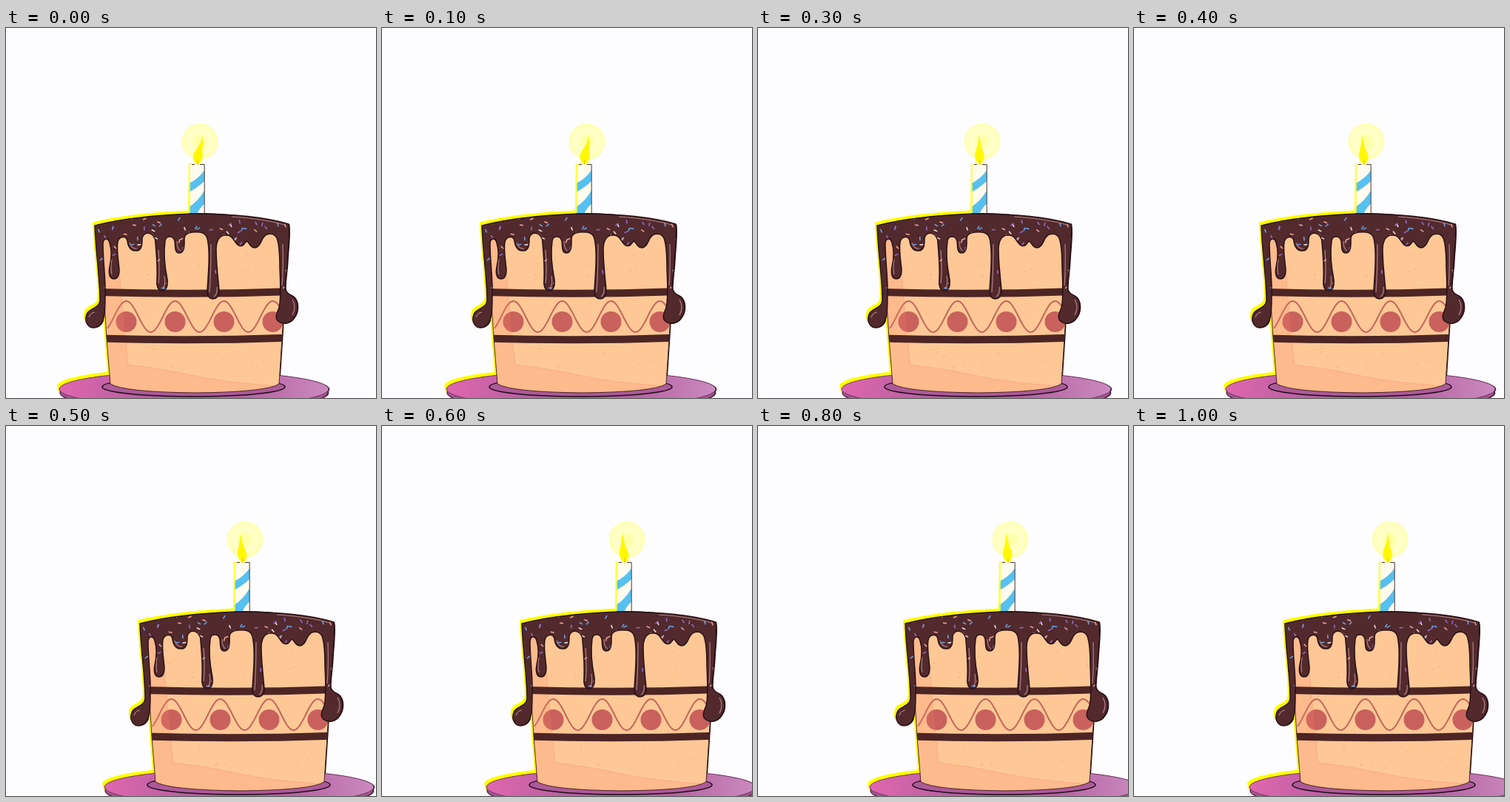
An HTML page with a canvas that plays this animation: 500 by 500 pixels, repeating every 1100 ms.

```html
<!DOCTYPE html>
<html lang="en">
<head>
<meta charset="utf-8">
<title>Birthday cake</title>
<style>
html, body { margin: 0; width: 100%; height: 100%; overflow: hidden; background: #fdfdff; }
canvas { display: block; width: 500px; height: 500px; }
</style>
</head>
<body>
<canvas id="stage" width="500" height="500"></canvas>
<script>
const ctx = document.getElementById('stage').getContext('2d');
const LOOP = 1100, STEP = 100, TRAVEL = 84, EASE_MS = 1050;
const TIPS = [265, 264, 261, 258, 256.5, 256, 256, 256, 257, 258, 259];
const WAVE_X = 162.5, WAVE_LEN = 66;

const body = new Path2D('M123 270 L132 355 L136 420 L141 481 Q160 492 256 493 Q352 492 369 481 L373 420 L377 355 L380 270 Z');
const icing = new Path2D(
  'M120 267 C150 259 200 253 250 251 C300 251 350 255 382 265' +
  'C384 278 381 300 380 320 L377 350 C377 356 382 360 387 362 C396 367 396 384 389 392' +
  'C384 400 374 401 369 397 C363 393 365 387 369 378 C372 365 371 345 370 325' +
  'C370 310 369 292 366 284 C362 276 352 277 348 283 C345 286 344 296 336 297' +
  'C329 297 329 289 325 288 C322 292 320 296 315 294 C308 291 308 280 298 280' +
  'C288 279 284 288 284 300 C284 320 287 340 288 355 C288 363 284 366 280 366' +
  'C275 366 272 362 272 355 C273 335 275 320 274 300 C273 285 272 277 262 276' +
  'C250 275 241 277 241 285 C241 292 242 304 234 304 C227 304 229 293 228 288' +
  'C226 280 216 280 215 288 C213 302 214 320 218 340 C219 350 216 355 211 355' +
  'C205 355 203 348 204 340 C205 320 203 305 202 290 C202 276 186 273 184 284' +
  'C184 292 184 301 176 301 C169 302 165 296 164 288 C163 280 153 281 151 289' +
  'C149 300 152 315 153 326 C153 335 150 339 146 339 C141 339 138 334 140 323' +
  'C143 310 143 300 140 290 C138 282 131 284 131 292 C131 315 135 340 134 362' +
  'C134 382 134 400 123 404 C112 408 105 398 109 387 C112 378 126 380 127 368' +
  'C127 340 121 300 120 267 Z');
const shine = new Path2D(
  'M305 255 Q350 258 376 266 M143 312 Q141 326 143 333 M206 300 Q208 330 206 345' +
  'M214 335 Q216 348 212 352 M277 292 Q277 330 275 357 M285 350 Q286 360 281 363' +
  'M187 281 Q193 275 200 281 M231 288 Q231 299 236 301 M167 290 Q170 299 177 298' +
  'M374 292 Q375 325 373 348 M112 391 Q114 385 120 384 M387 367 Q393 377 387 388');
const shade = new Path2D('M120 262 L149 262 Q154 360 165 455 Q215 461 250 469 Q300 480 372 484 L372 500 L130 500 Z');
const candle = new Path2D('M248 184 L268 183 L268 251 L247 251 Z');
const plate = ellipse(254, 488, 182, 24);
const rim = ellipse(254, 493, 181, 24);
const foot = ellipse(253.5, 485, 123.5, 13);

const plateFill = gradient(ctx.createLinearGradient(72, 0, 437, 0), '#e066ae', '#b3609f', '#b3609f', '#cb8abf');
const halo = gradient(ctx.createRadialGradient(262, 153.5, 4, 262, 153.5, 24.5), '#ffffa4', '#ffffcc', '#ffffb4');

function ellipse(x, y, rx, ry) {
  const path = new Path2D();
  path.ellipse(x, y, rx, ry, 0, 0, 2 * Math.PI);
  return path;
}

function gradient(paint, ...colors) {
  colors.forEach((c, i) => paint.addColorStop(i / (colors.length - 1), c));
  return paint;
}

function fill(path, color) {
  ctx.fillStyle = color;
  ctx.fill(path);
}

function stroke(path, color, width) {
  ctx.strokeStyle = color;
  ctx.lineWidth = width;
  ctx.stroke(path);
}

function inside(path, draw) {
  ctx.save();
  ctx.clip(path);
  draw();
  ctx.restore();
}

function random(seed) {
  return () => (seed = seed * 16807 % 2147483647) / 2147483647;
}

function silhouette(dx, dy, color) {
  ctx.save();
  ctx.translate(dx, dy);
  for (const p of [plate, rim, body, icing]) fill(p, color);
  ctx.restore();
}

// Yellow edge on the upper left, black edge on the right.
function drawEdges() {
  silhouette(1.3, .3, '#201018');
  const left = new Path2D();
  left.rect(0, 0, 248, 500);
  inside(left, () => silhouette(-3, -4.5, '#ffff00'));
}

function drawPlate() {
  fill(rim, '#a65490');
  stroke(rim, '#4a2040', 1.2);
  fill(plate, plateFill);
  stroke(plate, '#6d3560', 1);
  fill(foot, '#ac5a98');
  stroke(foot, '#1e0d18', 1.6);
}

function drawBand(y) {
  stroke(new Path2D(`M125 ${y} Q256 ${y + 4} 385 ${y - 1}`), '#4c2524', 10);
}

function drawBody() {
  fill(body, '#fdc896');
  inside(body, () => {
    const rnd = random(71);
    for (let i = 0; i < 26; i++) {
      const x = 140 + rnd() * 225, y = i < 16 ? 305 + rnd() * 40 : 430 + rnd() * 30;
      stroke(new Path2D(`M${x} ${y} l3 -2`), '#f9b48a', 1.2);
    }
    const wave = new Path2D();
    for (let x = 137; x < 380; x += 2) {
      wave.lineTo(x, 390 - 21 * Math.cos((x - WAVE_X) / WAVE_LEN * 2 * Math.PI));
    }
    stroke(wave, '#c4655c', 2);
    for (let i = 0; i < 4; i++) fill(ellipse(WAVE_X + i * WAVE_LEN, 397, 14, 14), '#c9615c');
    fill(shade, 'rgba(248,130,100,.2)');
    stroke(shade, 'rgba(235,115,95,.25)', 1);
    drawBand(357);
    drawBand(419.5);
  });
  stroke(body, '#3a1a1a', .9);
}

function drawIcing() {
  fill(icing, '#522a2d');
  inside(icing, () => {
    const rnd = random(2024);
    const colors = ['#f0a49c', '#6aa8f0', '#f6e4e4', '#9a6ad0'];
    for (let i = 0; i < 110; i++) {
      const x = 114 + rnd() * 272, y = i < 50 ? 256 + rnd() * 29 : 285 + rnd() * 110;
      const a = rnd() * Math.PI;
      stroke(new Path2D(`M${x} ${y} l${5 * Math.cos(a)} ${5 * Math.sin(a)}`), colors[i % 4], 1.5);
    }
    stroke(shine, 'rgba(218,165,170,.7)', 1.2);
  });
  stroke(icing, '#2a1114', 1.5);
}

function drawCandle() {
  ctx.save();
  ctx.translate(-1.2, -1);
  fill(candle, '#ffff30');
  ctx.restore();
  fill(candle, '#fffbee');
  inside(candle, () => {
    fill(new Path2D('M247 210 Q260 204 269 191 V206 Q260 215 247 222 Z'), '#56c0f0');
    fill(new Path2D('M247 242 Q260 234 269 218 V237 Q262 242 258 252 H247 Z'), '#56c0f0');
  });
  stroke(new Path2D('M248 184 V250'), '#ffff30', 1.5);
  stroke(new Path2D('M251 184.5 H255 M262 184.5 H268.2 V251'), '#4a363b', 1);
  stroke(new Path2D('M247 251 Q275 250 300 252.5'), '#251216', 1.5);
}

function drawFlame(tip) {
  fill(ellipse(262, 153.5, 24.5, 24.5), halo);
  const mid = 258.5 + (tip - 259) * .45;
  fill(new Path2D(`M259 184 C251 181 251 171 ${mid - 4} 164 Q${tip - 1} 156 ${tip} 145 Q${tip + 2} 158 ${mid + 4} 165 C267 175 264 182 259 184 Z`), '#fff800');
  stroke(new Path2D('M259 178 V185'), '#e6c800', 1.2);
}

function frame(now) {
  const step = Math.floor(now % LOOP / STEP);
  const left = 1 - step * STEP / EASE_MS;
  ctx.fillStyle = '#fdfdff';
  ctx.fillRect(0, 0, 500, 500);
  ctx.save();
  ctx.translate(Math.round(TRAVEL * (1 - left * left)), 0);
  drawEdges();
  drawPlate();
  drawBody();
  drawIcing();
  drawCandle();
  drawFlame(TIPS[step]);
  ctx.restore();
}

const start = performance.now();
function tick() {
  frame(performance.now() - start);
  requestAnimationFrame(tick);
}
tick();
</script>
</body>
</html>
```
